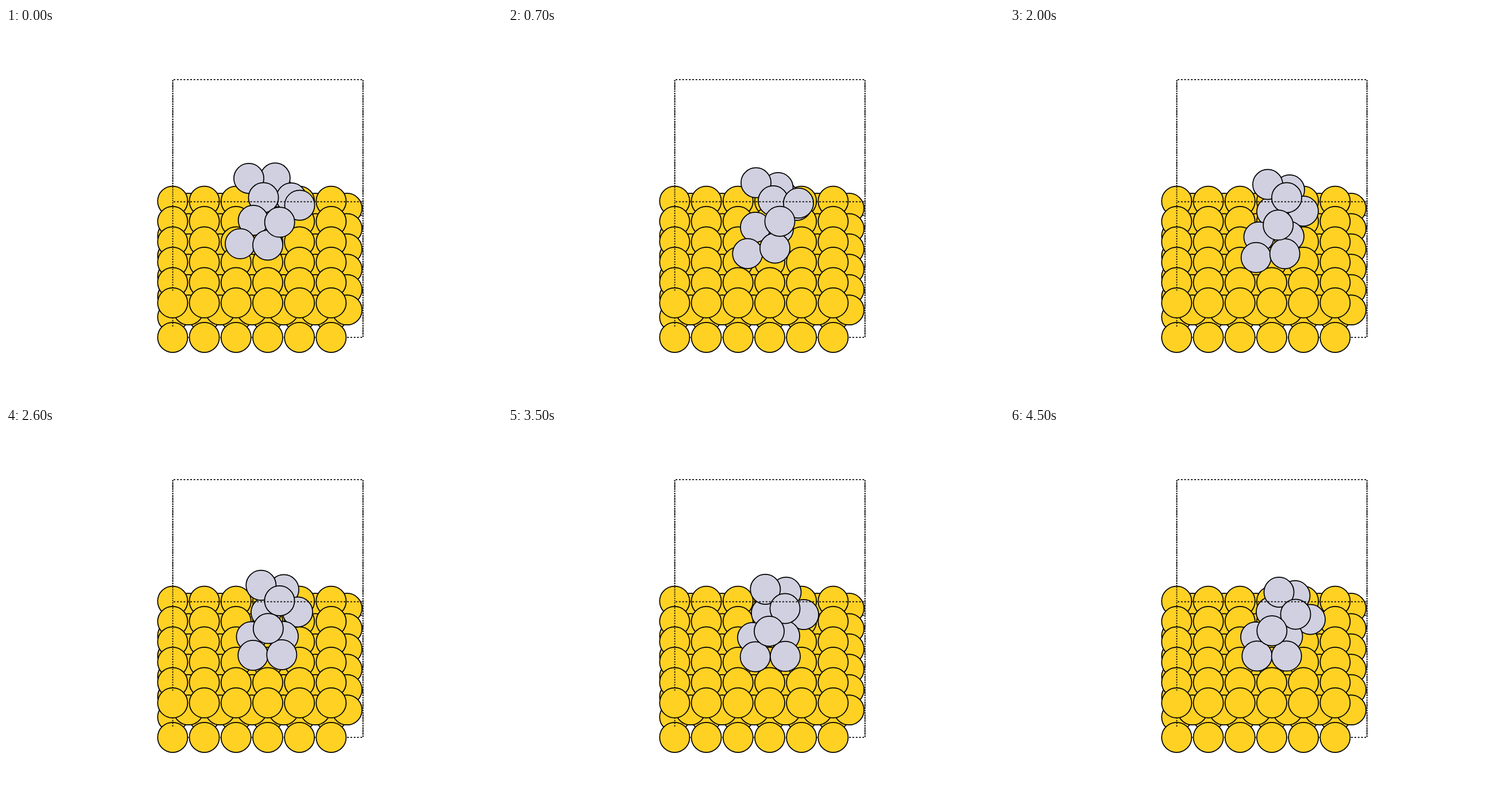
Animation of 864 by 648 pixels, one loop 4600 ms. Source, as an HTML page with a canvas:

```html
<!DOCTYPE html>
<html>
<head>
<meta charset="utf-8">
<style>
html, body { margin: 0; width: 100%; height: 100%; overflow: hidden; background: #fff; }
canvas { display: block; }
</style>
</head>
<body>
<canvas id="stage" width="864" height="648"></canvas>
<script>
const ctx = document.getElementById('stage').getContext('2d');
const GOLD = '#ffd123', SILVER = '#d0d0e0';
const LOOP = 4600, STEP = 100;

// Projected unit cell: one lattice step across, one in depth, one layer up
const LEFT = 290.5, BOTTOM = 538.9, DX = 55.22, DY = 35.43, RISE = 30.05;
const RIGHT = LEFT + 6 * DX, DEPTH = 6 * DY, HEIGHT = 236.4;
const BACK = BOTTOM - DEPTH, FRONT_TOP = BOTTOM - HEIGHT, TOP = BACK - HEIGHT;

// Cluster atoms: x, y pairs at each key time
const times = [0, 700, 1300, 2000, 2600, 3500, 4500];
const paths = {
  a: [423, 262, 432, 269.5, 437.5, 273, 449, 272.5, 444.3, 274, 448.3, 281, 468.5, 286],
  b: [468.8, 261.3, 470.5, 278, 475, 281.5, 487, 282, 484, 281.5, 484.5, 286, 496.5, 292],
  c: [448.5, 295.5, 462, 301, 459, 314, 456, 320, 453, 321, 450, 322, 455, 320.5],
  d: [497, 296, 503, 309, 507, 312.5, 511, 319, 508, 320.5, 515, 325, 523, 333.5],
  e: [511.5, 308.7, 506, 305, 496.5, 300, 482, 295.5, 476.5, 301, 482.5, 314.5, 497.5, 324.5],
  f: [430.7, 335, 431, 347, 441.5, 361, 433.5, 364, 427.5, 363.5, 426, 365, 428, 364],
  g: [476.7, 338.3, 473.5, 336.7, 480.3, 345.3, 467.2, 343.3, 456.8, 349.3, 455, 354, 456.3, 353.2],
  h: [408, 375.8, 417.3, 393, 428.8, 401, 428.7, 399.8, 430.3, 396, 430.7, 398.5, 430.3, 397.2],
  i: [456, 378.2, 465, 383.5, 480.5, 394, 478.7, 393.2, 480.3, 395, 483, 397.8, 481.7, 397.3],
  j: [470, 341, 471, 350, 486.5, 360.5, 486, 363, 483, 363, 482, 362, 483.5, 363]
};

function ball(x, y, color) {
  ctx.beginPath();
  ctx.arc(x, y, 26.1, 0, 2 * Math.PI);
  ctx.fillStyle = color;
  ctx.fill();
  ctx.stroke();
}

function edge(x1, y1, x2, y2, count) {
  const period = Math.hypot(x2 - x1, y2 - y1) / count;
  ctx.save();
  ctx.setLineDash([period / 2, period / 2]);
  ctx.lineDashOffset = -period / 4;
  ctx.beginPath();
  ctx.moveTo(x1, y1);
  ctx.lineTo(x2, y2);
  ctx.stroke();
  ctx.restore();
}

const across = y => edge(LEFT, y, RIGHT, y, 57);
const inDepth = (x, y) => edge(x, y, x, y + DEPTH, 57);
const upright = (x, y) => edge(x, y, x, y + HEIGHT, 53);

function slab() {
  for (let layer = 0; layer < 3; layer++) {
    const shift = layer === 1 ? 0.5 : 0;
    for (let row = 5; row >= 0; row--) {
      for (let col = 0; col < 6; col++) {
        ball(LEFT - 0.2 + (col + shift) * DX, BOTTOM - layer * RISE - (row + shift) * DY, GOLD);
      }
    }
  }
}

function spline(path, t) {
  const last = times.length - 1;
  let k = 0;
  while (k < last - 1 && t >= times[k + 1]) k++;
  const span = times[k + 1] - times[k], u = (t - times[k]) / span;
  return [0, 1].map(axis => {
    const at = n => path[2 * n + axis];
    const slope = n => {
      const lo = Math.max(n - 1, 0), hi = Math.min(n + 1, last);
      return (at(hi) - at(lo)) / (times[hi] - times[lo]) * span;
    };
    const p = at(k), q = at(k + 1), m = slope(k), n = slope(k + 1);
    return p + u * (m + u * (3 * (q - p) - 2 * m - n + u * (2 * (p - q) + m + n)));
  });
}

function cluster(t) {
  const pos = {};
  for (const name in paths) pos[name] = spline(paths[name], Math.min(t, 4500));
  // Buried atom, held by three neighbours
  pos.x = [0, 1].map(n => 0.4 * pos.b[n] + 0.3 * pos.c[n] + 0.3 * pos.e[n]);
  const order = t < 1600 ? 'xbdjacfhieg' : 'xbdjcafhieg';
  for (const name of order) ball(...pos[name], SILVER);
}

function draw(t) {
  ctx.clearRect(0, 0, 864, 648);
  ctx.strokeStyle = '#000';
  ctx.lineWidth = 1.75;

  across(TOP);
  across(BACK);
  across(BOTTOM);
  for (const x of [LEFT, RIGHT]) {
    upright(x, TOP);
    inDepth(x, BACK);
  }
  slab();

  inDepth(LEFT, TOP);
  inDepth(RIGHT, TOP);
  upright(RIGHT, FRONT_TOP);
  // The front left edge passes behind the nearest atoms
  ctx.save();
  ctx.beginPath();
  ctx.rect(LEFT - 3, FRONT_TOP, 6, 458.5 - FRONT_TOP);
  ctx.rect(LEFT - 3, 505.5, 6, 16);
  ctx.clip();
  upright(LEFT, FRONT_TOP);
  ctx.restore();

  cluster(t);
  across(FRONT_TOP);
}

const start = performance.now();
function tick() {
  const t = (performance.now() - start) % LOOP;
  draw(Math.floor(t / STEP) * STEP);
  requestAnimationFrame(tick);
}
tick();
</script>
</body>
</html>
```
